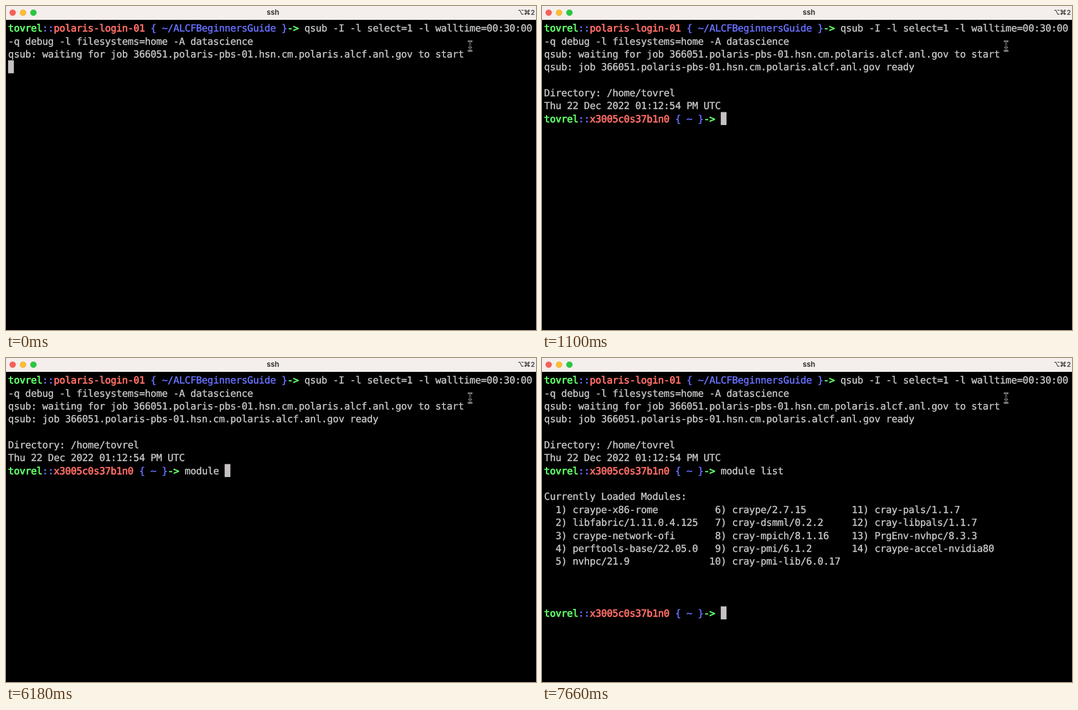
Animation, 957 px wide and 585 px high, one loop 8 s. Source, as an HTML page:

```html
<!DOCTYPE html>
<html lang="en">
<head>
<meta charset="utf-8">
<title>ssh</title>
<style>
  html, body { margin: 0; width: 100%; height: 100%; overflow: hidden; background: #000; }
  svg { display: block; width: 957px; height: 585px; }
  #screen text {
    font: 17.6px "DejaVu Sans Mono", monospace;
    letter-spacing: -.307px;
    font-variant-ligatures: none;
    white-space: pre;
    fill: #c7c7c7;
    stroke: #c7c7c7;
    stroke-width: .4px;
    text-rendering: geometricPrecision;
  }
  #screen .g { fill: #5ffa68; stroke: #5ffa68; stroke-width: .9px; }
  #screen .r { fill: #ff6e67; stroke: #ff6e67; stroke-width: .8px; }
  #screen .u { fill: #6871ff; stroke: #6871ff; stroke-width: .5px; }
  .bar { font: 700 13px Inter, sans-serif; fill: #3d3a38; }
  .keys { fill: none; stroke: #3d3a38; stroke-width: 1.2; }
  .lights { stroke: #000; stroke-opacity: .12; stroke-width: .8; }
</style>
</head>
<body>
<svg viewBox="0 0 957 585">
  <rect width="957" height="585"/>
  <rect width="957" height="25" fill="#f4efec"/>
  <g class="lights">
    <circle cx="12" cy="12" r="5.6" fill="#fe5f57"/>
    <circle cx="30.8" cy="12" r="5.6" fill="#febc2e"/>
    <circle cx="49.5" cy="12" r="5.6" fill="#28c840"/>
  </g>
  <text class="bar" x="482" y="16.3" text-anchor="middle">ssh</text>
  <g class="keys">
    <path d="M925 7.6h2.8l3.6 7.2h3.2M930.6 7.6h4"/>
    <path d="M939.4 8.4v5.6M942.6 8.4v5.6M938 9.6h6M938 12.8h6"/>
    <circle cx="938.1" cy="8.3" r="1.3"/>
    <circle cx="943.9" cy="8.3" r="1.3"/>
    <circle cx="938.1" cy="14.1" r="1.3"/>
    <circle cx="943.9" cy="14.1" r="1.3"/>
  </g>
  <text class="bar" x="947.4" y="15.5" style="font-size:12px;font-weight:600">2</text>

  <g id="screen"></g>
  <rect id="cursor" width="10.4" height="23.4" fill="#c7c2c2"/>

  <defs>
    <path id="beam" d="M835 63.4q3 0 3 2.6v12.4q0 2.6 -3 2.6M841 63.4q-3 0 -3 2.6v12.4q0 2.6 3 2.6M836.4 75h3.2" fill="none" stroke-linecap="round"/>
  </defs>
  <use href="#beam" stroke="#e8e8e8" stroke-width="2.5"/>
  <use href="#beam" stroke="#000" stroke-width="1"/>
</svg>
<script>
const LOOP = 8000, CELL_W = 10.289, CELL_H = 23.36, LEFT = 4, TOP = 28, BASE = 18.2;
const screen = document.getElementById('screen');
const cursor = document.getElementById('cursor');

const span = (color, text) => `<tspan class="${color}">${text}</tspan>`;
const prompt = (host, dir) =>
  span('g', 'tovrel') + span('u', '::') + span('r', host) + ' ' +
  span('u', `{ ${dir} }`) + span('g', '-&gt;') + ' ';

const job = '366051.polaris-pbs-01.hsn.cm.polaris.alcf.anl.gov';
const node = prompt('x3005c0s37b1n0', '~');
const NODE_COLS = 31;

const modules = [
  'craype-x86-rome', 'libfabric/1.11.0.4.125', 'craype-network-ofi',
  'perftools-base/22.05.0', 'nvhpc/21.9',
  'craype/2.7.15', 'cray-dsmml/0.2.2', 'cray-mpich/8.1.16',
  'cray-pmi/6.1.2', 'cray-pmi-lib/6.0.17',
  'cray-pals/1.1.7', 'cray-libpals/1.1.7', 'PrgEnv-nvhpc/8.3.3',
  'craype-accel-nvidia80'
];
const cell = (i, width) =>
  modules[i] ? (`${i + 1}) `.padStart(4) + modules[i]).padEnd(width) : '';
const moduleRow = r => ' ' + cell(r, 28) + cell(r + 5, 25) + cell(r + 10, 0);

// [row, time it appears, markup]
const lines = [
  [0, 0, prompt('polaris-login-01', '~/ALCFBeginnersGuide') +
    'qsub -I -l select=1 -l walltime=00:30:00'],
  [1, 0, '-q debug -l filesystems=home -A datascience'],
  [2, 0, `qsub: waiting for job ${job} to start`],
  [3, 500, `qsub: job ${job} ready`],
  [5, 980, 'Directory: /home/tovrel'],
  [6, 980, 'Thu 22 Dec 2022 01:12:54 PM UTC'],
  [7, 1100, node],
  [9, 7660, 'Currently Loaded Modules:'],
  ...[0, 1, 2, 3, 4].map(r => [10 + r, 7660, moduleRow(r)]),
  [18, 7660, node]
];

const command = 'module list';
const keys = [4930, 4990, 5100, 5580, 5700, 5820, 6180, 6360, 6440, 6520, 6590];

// [time, row, column]
const stops = [
  [0, 3, 0], [500, 5, 0], [980, 7, 0], [1100, 7, NODE_COLS],
  ...keys.map((t, i) => [t, 7, NODE_COLS + i + 1]),
  [7600, 8, 0], [7660, 18, NODE_COLS]
];

function addText(row, col, markup) {
  const el = document.createElementNS('http://www.w3.org/2000/svg', 'text');
  el.setAttribute('x', LEFT - 0.15 + col * CELL_W);
  el.setAttribute('y', TOP + row * CELL_H + BASE);
  el.innerHTML = markup;
  screen.append(el);
  return el;
}

const rows = lines.map(([row, time, markup]) => ({ time, el: addText(row, 0, markup) }));
const typed = addText(7, NODE_COLS, '');

function draw(t) {
  for (const { time, el } of rows) el.style.display = t >= time ? '' : 'none';
  typed.textContent = command.slice(0, keys.filter(k => t >= k).length);
  const [, row, col] = stops.filter(s => t >= s[0]).pop();
  cursor.setAttribute('x', LEFT - 0.2 + col * CELL_W);
  cursor.setAttribute('y', TOP + row * CELL_H);
}

const start = performance.now();
function tick() {
  draw((performance.now() - start) % LOOP);
  requestAnimationFrame(tick);
}
tick();
</script>
</body>
</html>
```
